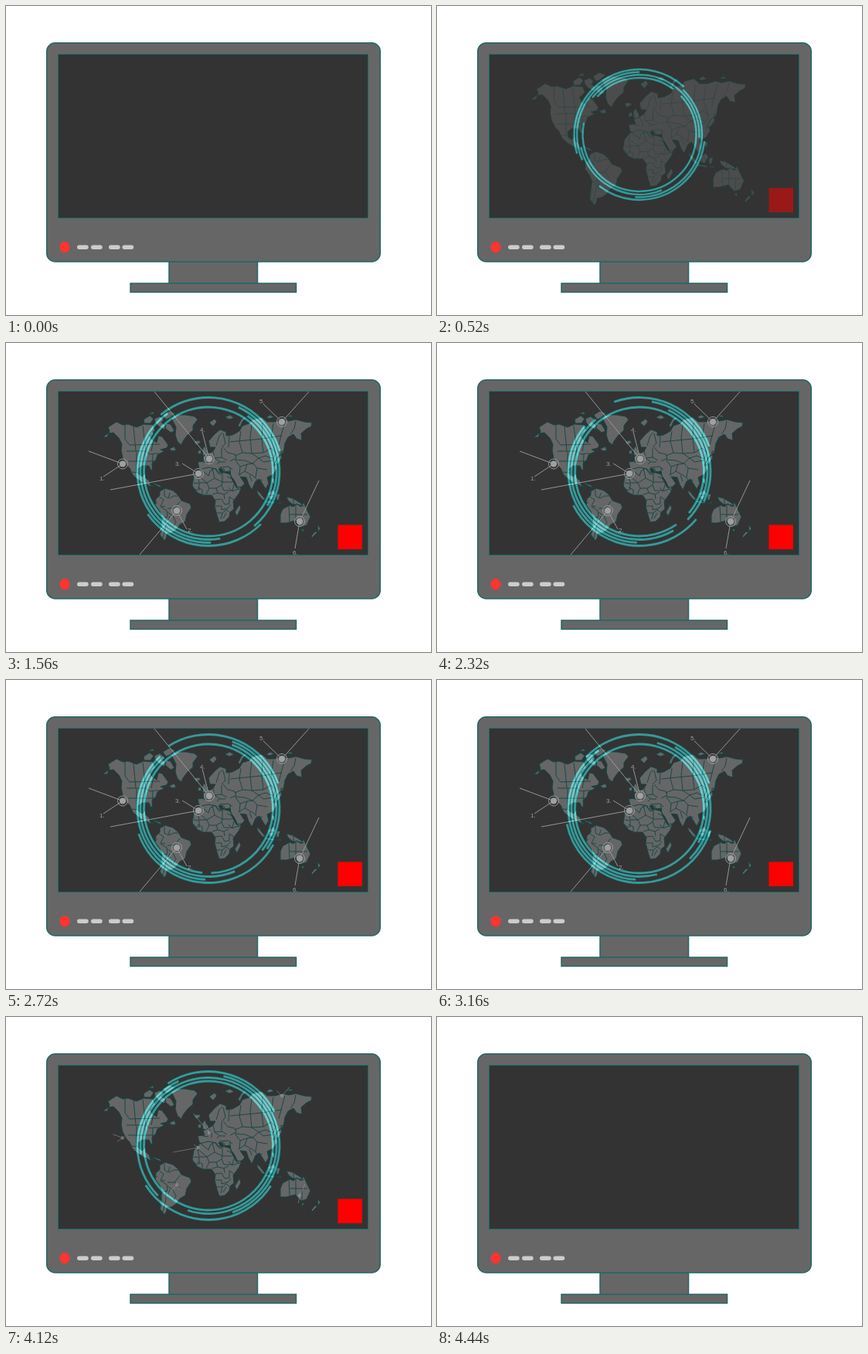
Animation, 550 px wide and 400 px high, one loop 4800 ms. Source, as an HTML page with a canvas:

```html
<!DOCTYPE html>
<html lang="en">
<head>
<meta charset="utf-8">
<title>World monitor</title>
<style>
html, body { margin: 0; width: 100%; height: 100%; overflow: hidden; background: #fff; }
canvas { display: block; width: 550px; height: 400px; }
</style>
</head>
<body>
<canvas id="stage" width="550" height="400"></canvas>
<script>
const ctx = document.getElementById('stage').getContext('2d');
const LOOP = 4800, STEP = 40, EDGE = '#246767';
const CX = 262, CY = 166.5;

const clamp = v => Math.max(0, Math.min(1, v));
const span = (t, a, b) => clamp((t - a) / (b - a));
const ease = p => 1 - (1 - p) ** 3;
const mix = (a, b, p) => a + (b - a) * p;

// Coastlines
const land = new Path2D([
  'M131 122l3-8-2-5 11-7 8 4 7-1 11 4 9-4 12 1 3 7-7 7 3 5 6 4 2-9 5 1 8 11-2 4-8 2 5 2-9 5-2 6-5 5 1 9-3-1-2-5-9 0-5 4 1 7 4 3 4-4 1 6 4 3 2 6 5 2-4 0-9-4-8-5-7-6-4-9-4-4-5-9-2-10 1-8-4-8-7-7-7 1-7 5z',
  'M214 97l8-4 10 0 12 2 4 4-6 8 0 6-7 6-6 8-2 5-5-4-3-9 1-10z',
  'M178 99l8-5 5 4-4 6-8 0zM192 98l7-3 5 4-3 4 6 4-2 5-7-4-5-5zM203 93l8-5 8 3-7 6-5 2zM207 104l6 1 5 9-5 2-7-6zM184 92l6-3 2 3zM211 137l7-3 2 5-5 1z',
  'M199 192l7-4 10 3 7 6 4 7 11 4 2 5-6 9-2 9-7 4-5 7-6 4-6 1 0 4-3 5-6-8 1-10 2-12-3-8-6-8 1-8 5-5z',
  'M250 164l12-3 10 2 2 4 10 1 6 2 3 8 5 9 7-1-3 8-8 11 1 10-5 4-1 6-6 6-7 1-3-9-3-12 1-7-5-7-11 0-7-3-7-9 2-12z',
  'M302 209l2 5-5 10-3-5z',
  'M250 162l-2-8 9-1-2-6 7-3 6-4 3-5-7 0-2-8 8-9 7-6 8 3 0 5 8-1 9-5 4-7 9-3 4-5 12-3 7 6 10 0 10-3 8 2 9-2 11 3 10 1-1 5-6 3-7 6 1 9-7-2-4-6-7 4-4 8-2 12-7 6-3 5 2 9-5 8-8 4 2 8-4 7-5-8-3-5-5 3-3 7-2 4-4-7-3-9-8-1 6 9-8 8-5-11-5-7-1-6-8 1-3-5-4 1 4 6-3 1-6-8-6 4-2 6z',
  'M254 138l3-5 4 8 1 4-7 1zM248 140l4-2 1 5-4 1zM243 127l7-1 2 3-6 3z',
  'M351 148l5-4 1 5-5 7-6 3zM356 140l4 1-4 3zM344 174l4 3-1 6-3-3z',
  'M324 190l4 3 8 10-4 0-6-7zM339 195l7-5 3 5-5 8-4-2zM350 196l5-1-2 8-3 1zM335 204l12 2 0 2-11-2zM363 199l8 2 10 6 4 4-8-2-6 0-6-5zM349 207l7-1 0 2z',
  'M355 222l3-7 9-5 5 2 4-4 6 4 3-6 5 11 4 8-5 11-7 2-8-8-11 3-8 0zM382 241l4 0-2 4z',
  'M403 235l4 5-3 4zM400 244l3 1-7 7-1-2zM190 181l9 3 3 3-4-1-8-4z',
  'M263 103l7-5 3 4-5 6zM283 96l7-3 5 4-6 2zM300 107l5-9 7-3-6 7-3 7zM337 96l5-3 5 3-7 2zM363 95l6-2 2 3z'
].join(''));

// Country and coast detail lines
const borders = new Path2D([
  'M154 104l0 20 5 7M156 140l25 0 5 4 8-1 7 0M165 108l3 32M177 107l4 33M159 132l40-1M192 120l-4 20',
  'M163 167l8 1 7 5M158 153l38 0M169 141l0 26M180 141l0 26M190 144l-1 24M178 183l5-1M186 188l4-4',
  'M205 190l0 8 5 3 2-7M198 199l6 4-4 8 6 1M211 201l6-3 7 0M191 210l5-4M200 212l8 5 1 8-9 2M209 219l7 5 4 8-4 6M207 226l0 10-4 17M199 226l3 13-3 10M212 224l-3 9 6 4M225 205l-7 9 7 8M218 214l-9 0',
  'M250 164l-1 8 11 9 10-6-3-13M260 181l-10 0-2-9M270 175l10 5 0-12M280 180l13 0M243 181l7 1 0 8-6 0M260 181l3 7-4 8M263 188l9 0 7-4 1-4M272 188l2 6-7 2M279 184l3 7 11 0 2-8M274 194l8 2 6-3M271 203l8-1 4 7 6-1 0-9 6 4M282 196l1 6M271 211l8 0 0 5 8-2 4-5M272 220l8 0 5-4 4 3M280 220l-2 8M285 220l-4 7M254 190l0 6M248 187l6 3M288 187l5 5 7-3',
  'M255 154l7 1M261 144l5 7 0 5M268 140l2 9 9-1M279 136l0 12 7 4M270 149l7 5 7 0M273 157l4-4M276 161l12-1 5 4M281 135l6 7 9 2 2 5-8 4M272 133l4-13 4-4M281 117l3 13-5 5M289 119l-1 16M281 162l4 7M290 161l0 9',
  'M296 146l10-4 12 1 9 6-8 7-10-4-13-1M297 152l6 8 9-3 8-1M303 160l-1 11M312 157l-3 9-8 5M309 166l11 6 3 3M327 149l9-3 10 4M327 149l6 5 13-2M346 150l3-8-6-6-10 6-15 1M320 156l5 6 13 2M325 162l-2 12M315 171l3 8M323 175l4 4 5-2M327 179l-2 5M286 173l9 4',
  'M304 114l-2 14 4 14M318 105l-2 18 2 20M332 103l-1 21 2 18M346 104l-3 20 6 18M361 102l-4 14-4 16M375 101l-2 10-5 7M290 128l41-4 26-4',
  'M366 211l1 20M375 210l0 21M367 222l23 0M383 222l0 15M338 197l9 0M372 202l0 7'
].join(''));

// Marker: dot, two line ends, label position
const pins = [
  [151, 156.5, 107, 140, 126, 173, 121, 178],
  [221, 217, 173, 274, 234, 241, 235, 245],
  [249, 169, 135, 190, 228, 156, 219, 159],
  [263, 150, 192, 63, 254, 115, 251, 115],
  [357, 102, 392, 63, 333, 79, 328, 78],
  [380, 231, 405, 178, 374, 266, 371, 273.5]
];

// Each ring: radius, then two arcs as start, end degrees at each key time
const keyTimes = [880, 1560, 2320, 3160, 3680];
const rings = [
  [96, [-125, 25, 78, 200], [-130, -16, 45, 145], [-110, -20, 40, 153], [-136, -20, 17, 168], [-176, -80, -20, 95]],
  [92, [-118, 22, 84, 198], [-65, 50, 88, 235], [-80, 25, 92, 220], [-60, 45, 93, 235], [-25, 123, 188, 298]],
  [88, [-70, 75, 140, 240], [-55, 30, 80, 215], [-65, 45, 60, 230], [-75, 30, 75, 228], [-25, 55, 120, 335]],
  [83.5, [-115, 120, 150, 235], [-130, 130, 130, 230], [-150, 40, 55, 210], [-140, 140, 140, 220], [-100, 35, 35, 260]]
];

function box(x, y, w, h, r, fill, stroke, width = 1.5) {
  ctx.beginPath();
  ctx.roundRect(x, y, w, h, r);
  ctx.fillStyle = fill;
  ctx.fill();
  if (!stroke) return;
  ctx.strokeStyle = stroke;
  ctx.lineWidth = width;
  ctx.stroke();
}

function drawMonitor() {
  box(211, 331, 114.5, 28, 0, '#666', EDGE);
  box(161, 359, 214.5, 11.5, 0, '#666', EDGE);
  box(52.7, 47.7, 431.6, 283.3, 11, '#666', EDGE);
  box(67.5, 62.5, 401, 212, 0, '#333', '#1b6b6b', 1);
  ctx.beginPath();
  ctx.ellipse(76, 312.3, 6.6, 7.3, 0, 0, 7);
  ctx.fillStyle = '#f33';
  ctx.fill();
  for (const x of [92, 110, 133, 150.5]) box(x, 309.5, 14.7, 5.4, 2.7, '#ccc');
}

function drawMap(alpha, scale) {
  ctx.save();
  ctx.globalAlpha = alpha;
  ctx.translate(257, 168);
  ctx.scale(scale, scale);
  ctx.translate(-257, -168);
  ctx.fillStyle = '#666';
  ctx.fill(land);
  ctx.strokeStyle = '#124545';
  ctx.lineWidth = 1;
  ctx.lineJoin = 'round';
  ctx.stroke(land);
  ctx.lineWidth = 0.9;
  ctx.stroke(borders);
  ctx.restore();
}

function drawPins(p) {
  ctx.save();
  ctx.globalAlpha = Math.min(1, p * 2);
  ctx.strokeStyle = ctx.fillStyle = '#a0a0a0';
  ctx.font = '8px "Liberation Sans", Arial, sans-serif';
  pins.forEach(([x, y, ax, ay, bx, by, lx, ly], i) => {
    ctx.lineWidth = 0.9;
    ctx.beginPath();
    ctx.moveTo(mix(x, ax, p), mix(y, ay, p));
    ctx.lineTo(x, y);
    ctx.lineTo(mix(x, bx, p), mix(y, by, p));
    ctx.stroke();
    ctx.beginPath();
    ctx.arc(x, y, 6.5 * p, 0, 7);
    ctx.stroke();
    ctx.beginPath();
    ctx.arc(x, y, 4 * p, 0, 7);
    ctx.fill();
    if (p > 0.7) ctx.fillText(i + 1 + '.', lx, ly);
  });
  ctx.restore();
}

function ringScale(t) {
  if (t < 760) return 1.25 * ease(span(t, 400, 760));
  if (t < 880) return mix(1.25, 1, span(t, 760, 880));
  return 1 - span(t, 4200, 4440) ** 2;
}

function drawRings(t) {
  const scale = ringScale(t);
  if (scale <= 0) return;
  let k = 0;
  while (k < keyTimes.length - 2 && t >= keyTimes[k + 1]) k++;
  const p = span(t, keyTimes[k], keyTimes[k + 1]);
  const spin = Math.min(0, t - 880) * 0.2 + Math.max(0, t - 3680) * 0.12;
  ctx.save();
  ctx.globalCompositeOperation = 'lighter';
  ctx.strokeStyle = '#006868';
  ctx.lineWidth = 2.8;
  ctx.translate(CX, CY);
  ctx.scale(scale, scale);
  rings.forEach(([r, ...keys], i) => {
    const ends = keys[k].map((a, j) =>
      (mix(a, keys[k + 1][j], p) + spin * (i % 2 ? -1 : 1)) * Math.PI / 180);
    for (const j of [0, 2]) {
      ctx.beginPath();
      ctx.arc(0, 0, r, ends[j], ends[j + 1]);
      ctx.stroke();
    }
  });
  ctx.restore();
}

function draw(t) {
  ctx.fillStyle = '#fff';
  ctx.fillRect(0, 0, 550, 400);
  drawMonitor();
  if (t < 320 || t >= 4440) return;
  const enter = span(t, 280, 760), leave = span(t, 4200, 4440);
  const alpha = enter * (1 - leave);
  const pinGrowth = ease(span(t, 600, 880)) * (1 - span(t, 3920, 4200));

  ctx.save();
  ctx.beginPath();
  ctx.rect(68, 63, 400, 211);
  ctx.clip();
  drawMap(alpha, 1 + 0.19 * (1 - ease(enter)) + 0.25 * leave);
  if (pinGrowth > 0) drawPins(pinGrowth);
  ctx.globalAlpha = alpha;
  box(429.5, 235.5, 31.5, 31.5, 0, '#f00');
  ctx.restore();
  drawRings(t);
}

const start = performance.now();
function tick() {
  const t = (performance.now() - start) % LOOP;
  draw(Math.floor(t / STEP) * STEP);
  requestAnimationFrame(tick);
}
tick();
</script>
</body>
</html>
```
